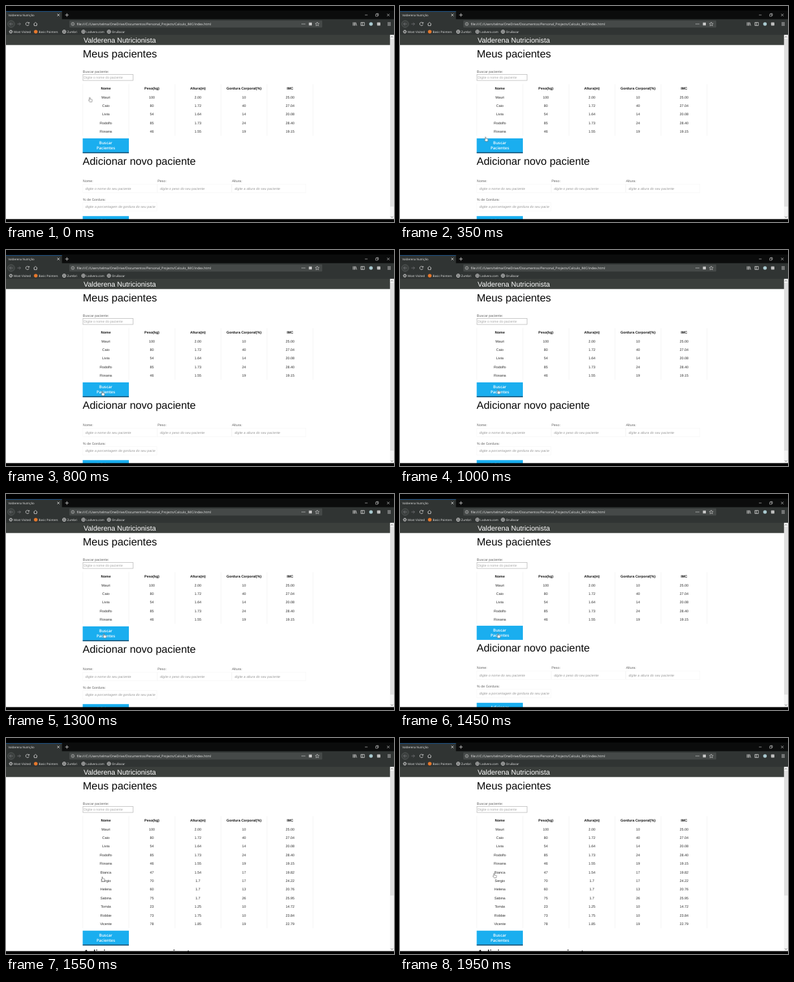
These frames come from a looping animation (600 by 336 pixels, 2 s). An HTML page:

```html
<!DOCTYPE html>
<html lang="pt">
<head>
<meta charset="utf-8">
<title>Valderena Nutrição</title>
<style>
html, body { margin: 0; width: 100%; height: 100%; overflow: hidden; background: #fff; }
svg { display: block; width: 600px; height: 336px; }
text { font: 5.45px "Liberation Sans", Arial, sans-serif; text-rendering: geometricPrecision; white-space: pre; }
.ui { font: 4.6px "Open Sans", "Noto Sans", sans-serif; fill: #ececec; }
.url { font-size: 5.1px; }
.brand { font-size: 10.9px; fill: #fff; }
.title { font-size: 16.4px; fill: #080808; }
.label { fill: #666; }
.hint { font-size: 5.2px; fill: #a6a6a6; }
.slant { font-size: 5.3px; font-style: italic; fill: #999; }
.mid { text-anchor: middle; }
.cell { fill: #2a2a2a; }
.head { font-weight: bold; fill: #111; }
.push { font: 600 6.2px "Open Sans", "Noto Sans", sans-serif; fill: #fff; }
.icon { fill: none; stroke: #d8d8d8; stroke-width: .8; }
.dim { stroke: #77777a; }
.rule { stroke: #f0f0f0; stroke-width: .7; fill: none; }
.field { stroke: #f6f6f6; }

#button, #below, #more, #lip, #thumb { animation: 2s step-end infinite; }
#button { animation-name: button; }
#below { animation-name: below; }
#more { animation-name: more; }
#lip { animation-name: lip; }
#thumb { animation-name: thumb; }
#hand { animation: hand 2s linear infinite; }

/* pressed at 72%, list loaded at 77% */
@keyframes button {
  0% { transform: translateY(0); }
  72% { transform: translateY(-1px); }
  77%, 100% { transform: translateY(93.8px); }
}
@keyframes below {
  0% { transform: translateY(0); }
  72% { transform: translateY(-2px); }
  77%, 100% { transform: translateY(93.8px); }
}
@keyframes more {
  0% { visibility: hidden; }
  77%, 100% { visibility: visible; }
}
@keyframes lip {
  0% { visibility: visible; }
  72% { visibility: hidden; }
  77%, 100% { visibility: visible; }
}
@keyframes thumb {
  0% { height: 261px; }
  77%, 100% { height: 194px; }
}
@keyframes hand {
  0% { transform: translate(130.5px, 145.5px); }
  8% { transform: translate(130.7px, 157px); }
  17.5% { transform: translate(133.3px, 207px); }
  24% { transform: translate(139px, 221px); }
  30% { transform: translate(145.5px, 226px); }
  36% { transform: translate(148px, 225px); }
  46%, 76% { transform: translate(152.5px, 220.5px); }
  77.5% { transform: translate(150px, 219.5px); }
  97.5%, 100% { transform: translate(146.5px, 214px); }
}
</style>
</head>
<body>
<svg viewBox="0 0 600 336">
  <rect width="600" height="336" fill="#fff"/>

  <g id="table"></g>
  <g id="more"></g>

  <text class="title" x="118.7" y="80.3">Meus pacientes</text>
  <text class="label" x="118.8" y="104">Buscar paciente:</text>
  <rect x="119" y="106.5" width="77.5" height="9.4" fill="#fff" stroke="#b2b2b2" stroke-width=".7"/>
  <text class="hint" x="120.3" y="113.3">Digite o nome do paciente</text>

  <g id="button">
    <rect x="118.6" y="205.9" width="71.4" height="22" fill="#1aaeef"/>
    <rect id="lip" x="118.6" y="227.4" width="71.4" height="1.7" fill="#14567c"/>
    <text class="push mid" x="154.3" y="215.4">Buscar</text>
    <text class="push mid" x="154.3" y="223.4">Pacientes</text>
  </g>

  <g id="below">
    <text class="title" x="118.5" y="247.2">Adicionar novo paciente</text>
    <g id="form"></g>
    <rect x="118.6" y="326.8" width="71.4" height="22" fill="#1aaeef"/>
    <text class="push mid" x="154.3" y="336.3">Adicionar</text>
  </g>

  <rect y="44" width="594" height="16.7" fill="#3b3f3c"/>
  <text class="brand" x="120" y="56.8">Valderena Nutricionista</text>

  <!-- scrollbar -->
  <rect x="593.8" y="45" width="6.2" height="288" fill="#f3f3f3"/>
  <rect id="thumb" x="594" y="51" width="5.6" height="261" fill="#dfdfdf"/>
  <path d="M595.2 49l1.6-1.8 1.6 1.8M595.2 327.4l1.6 1.8 1.6-1.8" fill="none" stroke="#666" stroke-width=".8"/>

  <!-- browser frame -->
  <rect width="600" height="21" fill="#0b0c0c"/>
  <rect y="20.5" width="600" height="24.3" fill="#303433"/>
  <rect y="8" width="86.5" height="13" fill="#303433"/>
  <rect y="8" width="86.5" height=".8" fill="#1a5c9c"/>
  <text class="ui" x="3.4" y="15.7" style="font-size:4.5px">Valderena Nutrição</text>
  <path class="icon" d="M79.2 12.2l3.6 3.6m0-3.6l-3.6 3.6M91.5 14h5.4m-2.7-2.7v5.4"/>
  <path class="icon" d="M555 14h4.2M571.7 12.8h3.2v3.2h-3.2zM572.8 12.8v-1h3.1v3.1h-1M589.2 12l4 4m0-4l-4 4" style="stroke-width:.6"/>

  <circle cx="8" cy="28" r="5.4" fill="#3c403f" stroke="#5f6362" stroke-width=".6"/>
  <path class="icon dim" d="M10.6 28H5.6m2.2-2.2L5.6 28l2.2 2.2M17.6 28h5m-2.2-2.2l2.2 2.2-2.2 2.2"/>
  <path class="icon" d="M35.4 26.6a2.6 2.6 0 1 0 .2 2.2M35.8 25v2h-2"/>
  <path class="icon" d="M42.6 28.2l3-2.8 3 2.8M43.6 27.6v3h4v-3"/>
  <rect x="98" y="22.6" width="391" height="10.8" rx="1" fill="#454948"/>
  <circle class="icon" cx="103.3" cy="28" r="2.3" style="stroke-width:.6"/>
  <path class="icon" d="M103.3 27.6v1.7M103.3 26.4v.6" style="stroke-width:.6"/>
  <text class="ui url" x="109.4" y="29.8">file:///C:/Users/telma/OneDrive/Documentos/Personal_Projects/Calculo_IMC/index.html</text>
  <path d="M457.2 28h1.2m.9 0h1.2m.9 0h1.2" stroke="#ddd" stroke-width="1.2"/>
  <rect x="468.4" y="25.8" width="4.6" height="4.4" fill="#c8c8c8"/>
  <path class="icon" d="M481.3 25l.9 2 2.1.2-1.6 1.5.5 2.1-1.9-1.1-1.9 1.1.5-2.1-1.6-1.5 2.1-.2z" style="stroke-width:.6"/>
  <path class="icon" d="M536.8 25.4v5.2m1.6-5.2v5.2m1.5-5.2v5.2m.9-5l1.4 5M548.8 25.6h5.4v4.8h-5.4zM551 25.6v4.8"/>
  <circle cx="564.4" cy="28" r="2.8" fill="#a9c9cf"/>
  <rect x="573.8" y="25.4" width="5.2" height="5.2" rx=".8" fill="#bdbdbd"/>
  <path class="icon" d="M590 26h5m-5 2h5m-5 2h5"/>

  <circle class="icon" cx="7.5" cy="40" r="1.7" style="stroke-width:1"/>
  <circle class="icon" cx="7.5" cy="40" r="2.6" stroke-dasharray="1 1.04"/>
  <circle cx="46" cy="40" r="2.8" fill="#e8792c"/>
  <g id="marks"></g>

  <rect width="600" height="7" fill="#000"/>
  <rect y="331.5" width="600" height="4.5" fill="#000"/>

  <g id="hand">
    <path d="M-1.7 -3.1q.6-.9 1.2 0V-.9l2.5.5q.9.2.8 1.1L2.2 3.6H-1.1L-2.9.9q.1-.8 1.2 0z" fill="#fff" stroke="#4a4a4a" stroke-width=".55"/>
  </g>
</svg>
<script>
const $ = id => document.getElementById(id);

function add(parent, tag, attrs, content = "") {
  const node = document.createElementNS("http://www.w3.org/2000/svg", tag);
  for (const key in attrs) node.setAttribute(key, attrs[key]);
  node.textContent = content;
  $(parent).appendChild(node);
}
const write = (parent, cls, x, y, content) => add(parent, "text", { class: cls, x, y }, content);

// patient table
const LEFT = 118.8, COL = 71.2, ROW = 13.4, SHORT = 5;
const patients = `Mauri 100 2.00 10 25.00
Caio 80 1.72 40 27.04
Livia 54 1.64 14 20.08
Rodolfo 85 1.73 24 28.40
Rosana 46 1.55 19 19.15
Bianca 47 1.54 17 19.82
Sergio 70 1.7 17 24.22
Helena 60 1.7 13 20.76
Sabina 75 1.7 26 25.95
Tomás 23 1.25 10 14.72
Robbie 73 1.75 10 23.84
Vicente 78 1.85 19 22.79`.split("\n").map(line => line.split(" "));

const row = (parent, cls, cells, y) =>
  cells.forEach((cell, i) => write(parent, cls + " mid", LEFT + COL * (i + .5), y, cell));

function rules(parent, top, bottom) {
  for (let i = 0; i < 6; i++) {
    const x = LEFT + COL * i;
    add(parent, "path", { class: "rule", d: `M${x} ${top}V${bottom}` });
  }
}

rules("table", 121.5, 202);
rules("more", 202, 295.8);
row("table", "head", ["Nome", "Peso(kg)", "Altura(m)", "Gordura Corporal(%)", "IMC"], 130);
patients.forEach((cells, i) => row(i < SHORT ? "table" : "more", "cell", cells, 143.5 + ROW * i));

// form fields
function field(x, y, label, hint) {
  write("form", "label", x, y, label);
  add("form", "rect", { class: "rule field", x, y: y + 2.8, width: 114.4, height: 13.2 });
  write("form", "slant", x + 4, y + 11.2, hint);
}
field(118.8, 274.4, "Nome:", "digite o nome do seu paciente");
field(234.2, 274.4, "Peso:", "digite o peso do seu paciente");
field(349.4, 274.4, "Altura:", "digite a altura do seu paciente");
field(118.8, 303, "% de Gordura:", "digite a porcentagem de gordura do seu pacie");

// bookmarks
write("marks", "ui", 12, 41.7, "Most Visited");
write("marks", "ui", 50.5, 41.7, "Basic Pointers");
[[90, "Zumbri"], [119.7, "Lodvera.com"], [159.2, "OruBazar"]].forEach(([x, name]) => {
  add("marks", "circle", { class: "icon", cx: x, cy: 40, r: 2.7 });
  add("marks", "path", { class: "icon", d: `M${x - 2.7} 40h5.4M${x} 37.3v5.4` });
  write("marks", "ui", x + 4.6, 41.7, name);
});
</script>
</body>
</html>
```
